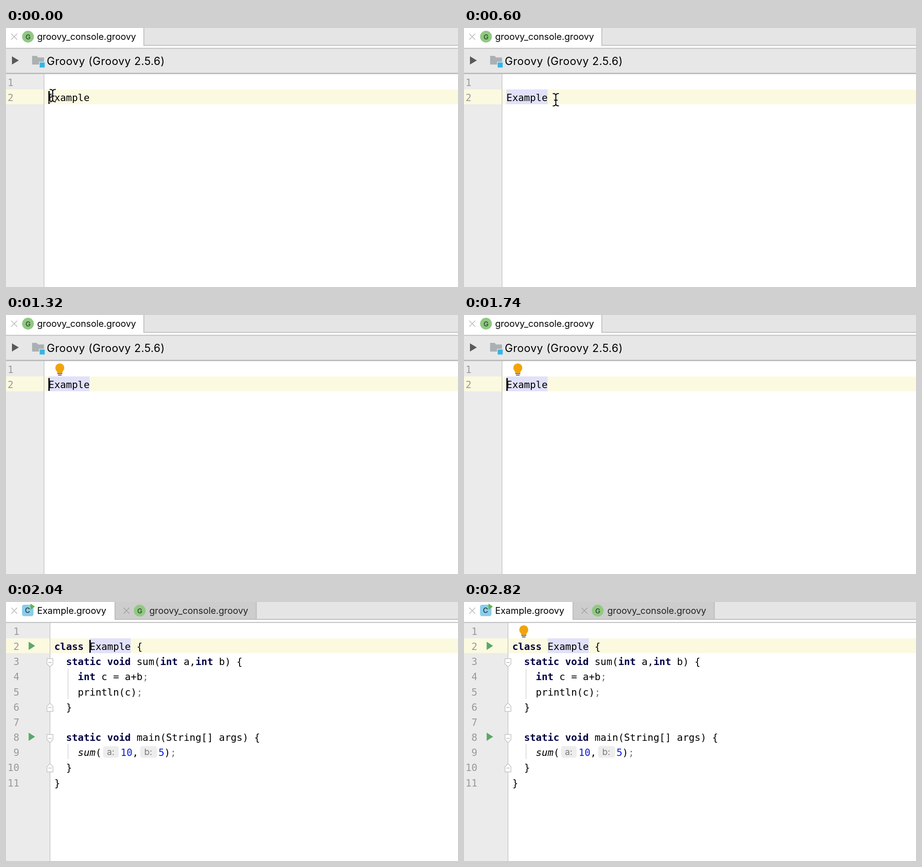
An HTML page that plays this animation: 987 by 567 pixels, repeating every 2880 ms.

```html
<!DOCTYPE html>
<html lang="en">
<head>
<meta charset="utf-8">
<title>Jump to class</title>
<style>
  html, body { margin: 0; width: 100%; height: 100%; overflow: hidden; background: #fff; }
  svg { display: block; width: 987px; height: 567px; }
  text { white-space: pre; }
  .ui { font-family: Inter, "Open Sans", sans-serif; fill: #000; }
  .code { font: 21.33px "DejaVu Sans Mono", "Liberation Mono", monospace; fill: #000; }
  .num { fill: #999; }
  .kw { font-weight: bold; fill: #000043; }
  .lit { fill: #0a1fd6; }
  .semi { fill: #777; }
  .call { font-style: italic; }
</style>
</head>
<body>
<svg id="stage" viewBox="0 0 987 567">
  <defs>
    <path id="close" d="M-6.5-6.5 6.5 6.5M6.5-6.5-6.5 6.5" stroke-width="1.7" fill="none"/>
    <g id="script">
      <circle r="12.9" fill="#90c982"/>
      <text class="ui" y="5.5" text-anchor="middle" font-size="15" font-weight="600" style="fill:#35502f">G</text>
    </g>
    <g id="bulb">
      <path d="M-5.5 20.5Q-5.5 17.5-7.5 15.7A9.8 9.8 0 1 1 7.5 15.7Q5.5 17.5 5.5 20.5Z" fill="#f1a409"/>
      <path d="M-5.5 21.8H5.5M-4 25.2H4" stroke="#555" stroke-width="1.8"/>
    </g>
    <path id="run" d="M0 0 14 9 0 18Z" fill="#59a869"/>
    <path id="fold" d="M-6.5-8.5H6.5V3L0 9.5-6.5 3Z" fill="#fff" stroke="#c3c3c3" stroke-width="1.5"/>
    <path id="beam" d="M-6-13.5Q0-13.5 0-9Q0-13.5 6-13.5M0-9V9M-6 13.5Q0 13.5 0 9Q0 13.5 6 13.5M-3 1H3"/>
  </defs>

  <rect width="987" height="567" fill="#fff"/>

  <g id="console">
    <rect x="301" width="686" height="38" fill="#e5e5e5"/>
    <path d="M301 0V38H987" fill="none" stroke="#c2c2c2" stroke-width="2"/>
    <use href="#close" x="18" y="19" stroke="#bdbdbd"/>
    <use href="#script" x="48" y="19"/>
    <text class="ui" x="68" y="26" font-size="19.75">groovy_console.groovy</text>
    <rect y="44" width="987" height="56" fill="#e7e7e7"/>
    <path d="M0 44.5H987" stroke="#c0c0c0" stroke-width="2"/>
    <path d="M0 99.5H987" stroke="#bcbcbc" stroke-width="3"/>
    <path d="M13 62 28 71 13 80Z" fill="#595959"/>
    <path d="M57 61H67L70 64.5H83V74H72V80H57Z" fill="#abb0b3"/>
    <rect x="73.5" y="75.5" width="11" height="11" fill="#35b5e5"/>
    <text class="ui" x="89" y="81" font-size="23.7" letter-spacing=".5">Groovy (Groovy 2.5.6)</text>
    <rect y="101" width="83" height="466" fill="#ebebeb"/>
    <rect y="134.5" width="987" height="32.5" fill="#fcf9e1"/>
    <path d="M83 101V567" stroke="#cfcfcf" stroke-width="1.8"/>
    <rect id="consoleMark" x="92.5" y="134.5" width="90" height="32.5" fill="#e1e1fa"/>
    <text class="code num" x="3.5" y="127">1</text>
    <text class="code num" x="3.5" y="160">2</text>
    <text class="code" x="92.6" y="160">Example</text>
    <rect id="consoleCaret" x="92.5" y="138" width="3" height="28"/>
    <use id="consoleBulb" href="#bulb" x="117.5" y="106.3"/>
    <g id="pointer" fill="none" stroke-linecap="round">
      <use href="#beam" stroke="#fff" stroke-width="4.2"/>
      <use href="#beam" stroke="#000" stroke-width="2.1"/>
    </g>
  </g>

  <g id="editor">
    <rect x="238" width="309" height="38" fill="#cdcdcd"/>
    <rect x="547" width="440" height="38" fill="#e5e5e5"/>
    <path d="M238 0V38H987M546.5 0V38" fill="none" stroke="#bcbcbc" stroke-width="2"/>
    <use href="#close" x="18" y="19" stroke="#bdbdbd"/>
    <g id="classIcon">
      <rect x="35" y="6" width="25" height="25" rx="4.5" fill="#8bcdea"/>
      <text class="ui" x="47" y="24.3" text-anchor="middle" font-size="15.5" font-weight="600" style="fill:#2c4855">C</text>
      <path d="M53.5 3.5 63 10 53.5 17Z" fill="#62b543"/>
    </g>
    <text class="ui" x="68" y="26" font-size="19.9">Example.groovy</text>
    <use href="#close" x="263" y="19" stroke="#a3a3a3"/>
    <use href="#script" x="292" y="19"/>
    <text class="ui" x="313" y="26" font-size="19.75" style="fill:#222">groovy_console.groovy</text>
    <rect y="45" width="96" height="522" fill="#ebebeb"/>
    <rect y="79.5" width="987" height="32.5" fill="#fcf9e1"/>
    <path d="M0 44.7H987" stroke="#bdbdbd" stroke-width="2"/>
    <path d="M96 46V567" stroke="#cfcfcf" stroke-width="1.8"/>
    <rect x="182.5" y="79.5" width="90" height="32.5" fill="#e1e1fa"/>
    <use href="#run" x="49.5" y="87"/>
    <use href="#run" x="49.5" y="286"/>
    <g id="folds"></g>
    <g id="lines"></g>
    <g id="plainCall"></g>
    <g id="hints">
      <path d="M135.5 146V212M135.5 311V344" stroke="#d6d6d6" stroke-width="1.6"/>
      <rect x="212" y="315.5" width="34" height="25.5" rx="5" fill="#ededed"/>
      <rect x="293" y="315.5" width="37" height="25.5" rx="5" fill="#ededed"/>
      <g font-size="19">
        <text class="ui" x="220.5" y="335" style="fill:#777">a:</text>
        <text class="ui" x="302" y="335" style="fill:#777">b:</text>
      </g>
      <g id="hintedCall"></g>
    </g>
    <rect id="editorCaret" x="182" y="83" width="3" height="28"/>
    <use id="editorBulb" href="#bulb" x="130.5" y="51.3"/>
  </g>
</svg>
<script>
const LOOP = 2880, STEP = 60, OPEN = 1800;
const ADVANCE = 12.84, LEFT = 105.5, ROW = 33.15;
const el = id => document.getElementById(id);
const baseline = line => 72 + (line - 1) * ROW;

const source = [
  '',
  'class Example {',
  '  static void sum(int a,int b) {',
  '    int c = a+b;',
  '    println(c);',
  '  }',
  '',
  '  static void main(String[] args) {',
  '',
  '  }',
  '}'
];

const highlight = code => code
  .replace(/\b(class|static|void|int)\b|(\d+)|(;)|(^sum)/g, (s, kw, lit, semi) =>
    `<tspan class="${kw ? 'kw' : lit ? 'lit' : semi ? 'semi' : 'call'}">${s}</tspan>`);

const codeText = (x, line, code) =>
  `<text class="code" x="${x}" y="${baseline(line)}">${highlight(code)}</text>`;

el('lines').innerHTML = source.map((code, i) => {
  const line = i + 1, indent = code.search(/\S/);
  const number = `<text class="code num" x="29.2" y="${baseline(line)}" text-anchor="end">${line}</text>`;
  return number + (code ? codeText(LEFT + indent * ADVANCE, line, code.trim()) : '');
}).join('');

const callX = LEFT + 4 * ADVANCE;
el('plainCall').innerHTML = codeText(callX, 9, 'sum(10,5);');
el('hintedCall').innerHTML =
  codeText(callX, 9, 'sum(') + codeText(250.3, 9, '10,') + codeText(333, 9, '5);');

el('folds').innerHTML = [[132.5, 1], [231, -1], [298.5, 1], [363.5, -1]].map(([y, dir]) =>
  `<use href="#fold" transform="translate(96 ${y}) scale(1 ${dir})"/>
   <path d="M92.5 ${y}H99.5" stroke="#b5b5b5" stroke-width="1.5"/>`).join('');

// Pointer keys: time, x, y
const path = [[0, 102, 148], [60, 104, 148], [360, 194.5, 155], [480, 203, 157], [720, 198, 157]];

function pointerAt(t) {
  const next = path.findIndex(key => key[0] > t);
  if (next < 0) return path[path.length - 1].slice(1);
  const [t0, x0, y0] = path[next - 1], [t1, x1, y1] = path[next];
  const u = (t - t0) / (t1 - t0), k = u * u * (3 - 2 * u);
  return [x0 + (x1 - x0) * k, y0 + (y1 - y0) * k];
}

const show = (id, on) => { el(id).style.display = on ? '' : 'none'; };
const within = (t, from, to) => t >= from && t < to;

function render(time) {
  const t = Math.floor((time % LOOP) / STEP) * STEP;
  show('console', t < OPEN);
  show('editor', t >= OPEN);

  show('consoleMark', t >= 600);
  show('consoleBulb', t >= 720);
  show('consoleCaret', !within(t, 420, 900) && !within(t, 1380, 1680));
  show('pointer', t < 1020);
  el('pointer').setAttribute('transform', `translate(${pointerAt(t)})`);

  show('classIcon', t >= 1920);
  show('plainCall', t < 1980);
  show('hints', t >= 1980);
  show('editorCaret', t < 2340);
  show('editorBulb', t >= 2460);
}

const start = performance.now();
function tick() {
  render(performance.now() - start);
  requestAnimationFrame(tick);
}
tick();
</script>
</body>
</html>
```
